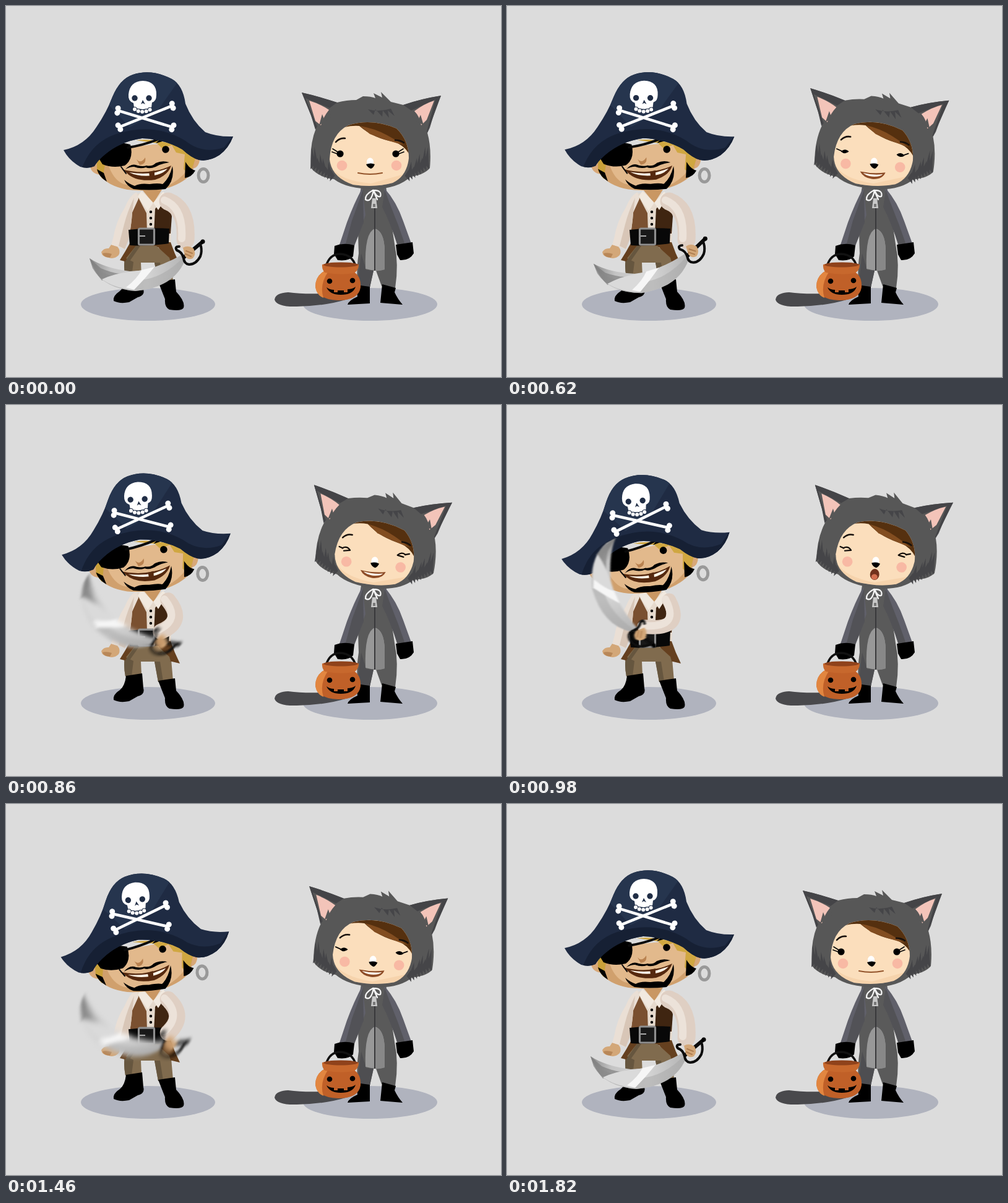
Animation of 800x600 px, one loop 1940 ms. Source, as an HTML page:

```html
<!DOCTYPE html>
<html lang="en">
<head>
<meta charset="utf-8">
<title>Pirate and cat</title>
<style>
html, body { margin: 0; width: 100%; height: 100%; overflow: hidden; background: #dcdcdc; }
svg { display: block; width: 100%; height: 100%; }
.line { fill: none; stroke-linecap: round; stroke-linejoin: round; }
</style>
</head>
<body>
<svg viewBox="0 0 800 600">
<defs>
  <linearGradient id="steel" x1="0" x2="1">
    <stop offset="0" stop-color="#8b8b8b"/><stop offset=".22" stop-color="#c4c4c4"/>
    <stop offset=".6" stop-color="#d4d4d4"/><stop offset="1" stop-color="#b4b4b4"/>
  </linearGradient>
  <filter id="smear" x="-20%" y="-60%" width="140%" height="220%"><feGaussianBlur id="blur" stdDeviation="0"/></filter>
  <clipPath id="hatClip"><use href="#hatShape"/></clipPath>
  <clipPath id="faceClip"><use href="#faceShape"/></clipPath>
  <g id="knob" fill="#fff"><circle cx="47" cy="-3.5" r="4.5"/><circle cx="46" cy="4" r="4.5"/></g>
  <g id="bone"><path d="M-45 0H45" stroke="#fff" stroke-width="4.6"/><use href="#knob"/><use href="#knob" transform="scale(-1 1)"/></g>
  <ellipse id="shadow" cy="482.5" rx="108.5" ry="26.5" fill="#b0b3be"/>
</defs>

<use href="#shadow" x="229.5"/><use href="#shadow" x="588.5"/>

<!-- pirate: legs and body -->
<path d="M193 400H266L270 446L246 448L240 415H218L219 437L193 439Q189 420 193 400Z" fill="#806b4e"/>
<path d="M193 400H218L206 414L203 438L193 439Q189 420 193 400ZM240 415H249L254 447L246 448Z" fill="#66563f"/>
<path d="M194 438L220 434L222 458Q225 468 213 471L199 479Q184 482 174 477Q172 469 184 461Q192 455 194 438Z"/>
<path d="M246 446L273 442L275 462Q290 478 287 488Q284 494 264 491Q256 487 257 474Z"/>
<path d="M208 305L232 298L258 304L267 365L266 388H200L202 335Z" fill="#e6dacd"/>
<path d="M214 310L227 335L228 366H200L203 332Z" fill="#7a5030"/>
<path d="M241 328L258 308L268 340L266 368H239Z" fill="#3f2511"/>
<path d="M201 382H266Q272 400 281 418L264 414L246 390H213Q204 400 196 414L184 411Q193 397 201 382Z" fill="#65401f"/>
<path d="M210 388H243L264 407L266 414H206L194 408Z" fill="#806b4e"/>
<path d="M210 388H217L199 414H192Z" fill="#66563f"/>
<path d="M220 297H252L238 319Z" fill="#c99763"/>
<path d="M219 299L238 318L229 332L213 308ZM254 300L238 318L246 330L260 308Z" fill="#f1e9df"/>
<path d="M234 333V354" class="line" stroke="#000" stroke-width="4.4" stroke-dasharray="0 10"/>
<path d="M180 389Q186 396 182 403Q175 410 166 407Q155 406 154 398Q158 391 166 392L170 386Z" fill="#d3a778"/>
<path d="M156 400Q163 398 171 401L168 407Q157 406 156 400Z" fill="#b88758"/>
<path d="M211 301Q200 306 192 326Q178 347 173 376L170 386L192 393L198 378Q202 360 204 334L214 312Z" fill="#eadfd5"/>
<path d="M207 310Q196 333 191 353L182 388L192 393L198 378Q203 352 204 334Z" fill="#d8c6b7"/>
<g id="belt">
  <path d="M198 362Q230 358 264 360L263 384Q230 389 200 387Z" fill="#080808"/>
  <rect x="214.5" y="360" width="25" height="26" rx="2" fill="#191919" stroke="#8f8f8f" stroke-width="3.2"/>
  <path d="M216 372H225" stroke="#aaa" stroke-width="2"/>
</g>
<path id="sleeve" class="line" stroke="#dfcfc3" stroke-width="28"/>
<path id="sheen" class="line" stroke="#ece2d9" stroke-width="12" transform="translate(-6 -2)"/>

<!-- pirate: head -->
<g id="head">
  <ellipse cx="319" cy="274" rx="8" ry="10.5" class="line" stroke="#999" stroke-width="5"/>
  <path d="M296 236Q312 232 313 249Q311 264 298 263ZM152 250Q137 248 136 260Q139 273 156 273Z" fill="#d8a878"/>
  <path d="M144 240H306L302 268Q290 285 262 294Q228 301 196 297Q164 291 150 272Z" fill="#d0a06d"/>
  <path d="M160 232L287 219L294 264Q280 283 258 292Q220 297 190 288Q166 278 160 232Z" fill="#e2b98c"/>
  <path d="M147 246L166 230L160 256L156 280L147 267Z" fill="#c9a03a"/>
  <path d="M210 217Q250 213 296 233L306 247L297 273L287 264L289 240L275 237L268 225L252 230L244 222Z" fill="#d0a741"/>
  <path d="M147 264Q150 276 163 284L158 270ZM290 252Q297 264 306 266Q300 277 289 278Z"/>
  <path d="M151 248Q151 221 179 219L201 224Q207 247 192 258Q173 263 156 256Z"/>
  <path d="M197 229Q222 225 245 216" class="line" stroke="#090909" stroke-width="4"/>
  <path d="M242 222L250 214L260 217Z"/>
  <circle cx="258" cy="232" r="5.8"/>
  <path d="M211 248Q218 256 225 245Q227 256 216 257Z" fill="#b98250"/>
  <path d="M193 264Q203 253 213 258Q222 260 227 258Q236 260 242 254Q253 249 264 253Q250 255 242 260Q232 264 226 261Q217 264 207 260Q200 260 193 264Z"/>
  <path d="M187 264Q214 271 238 267Q253 265 267 258Q262 274 241 281Q210 285 195 270Z" fill="#55290f"/>
  <path d="M199 269Q222 273 242 269L261 263Q255 271 239 274Q215 277 199 269Z" fill="#fff6e8"/>
  <path d="M231 268L240 266V276H232Z" fill="#55290f"/>
  <path d="M186 260L194 271" class="line" stroke="#0b0b0b" stroke-width="2"/>
  <path d="M191 281Q199 288 208 291Q216 286 232 288Q246 286 253 288Q264 279 269 259Q273 282 258 296Q230 299 206 296Q195 291 191 281Z"/>
  <path id="hatShape" d="M93 233Q127 226 146 196Q163 171 172 147Q184 118 205 111Q235 101 268 118Q286 128 290 158Q301 186 322 204Q342 212 367 211Q360 230 345 241Q328 252 312 249Q300 246 285 232Q255 215 220 214Q185 219 160 240Q148 250 143 259Q132 264 120 260Q102 250 93 233Z" fill="#1f2b43"/>
  <g clip-path="url(#hatClip)">
    <path d="M166 160L187 100H270L277 124L243 172L200 196Z" fill="#26354e"/>
    <path d="M122 264Q137 221 178 207Q240 187 290 218Q317 240 352 229L368 209L360 260L300 260Q260 219 225 217Q177 218 150 260Z" fill="#162034"/>
  </g>
  <path d="M221 121Q244 122 243 144Q243 154 236 156L235 164Q221 170 207 164L206 157Q197 154 198 143Q200 122 221 121Z" fill="#fff"/>
  <g fill="#202d45"><circle cx="208" cy="149" r="4.7"/><circle cx="231" cy="149" r="4.7"/><path d="M221 152L225 159L221 157L218 159Z"/></g>
  <g class="line" stroke-dasharray="0 6.5">
    <path d="M208 167Q220 175 234 167" stroke="#202d45" stroke-width="8"/>
    <path d="M208 167Q220 175 234 167" stroke="#fff" stroke-width="6"/>
  </g>
  <use href="#bone" transform="translate(225 182.5) rotate(17)"/>
  <use href="#bone" transform="translate(226 178.5) rotate(-22)"/>
</g>

<!-- blade root is the origin -->
<g id="sword"><g id="metal">
  <path d="M33 -23L3 2" class="line" stroke="#0b0b0b" stroke-width="6"/>
  <path d="M1 -13Q9 -18 18 -12Q23 -3 17 4Q9 8 4 0Z" fill="#d3a778"/>
  <path d="M6 -8L16 -4M5 -3L14 1" class="line" stroke="#af7e51" stroke-width="2"/>
  <path d="M-150 4Q-126 20 -85 25Q-48 25 0 -2L4 8Q-15 52 -76 57Q-126 53 -145 20Z" fill="url(#steel)"/>
  <path d="M-150 4Q-143 24 -124 29Q-80 48 -42 33Q-18 23 1 3L4 8Q-15 52 -76 57Q-126 53 -145 20Z" fill="#a8a8a8" opacity=".5"/>
  <path d="M-150 4L-132 20Q-116 27 -101 29L-130 40Q-143 25 -150 4Z" fill="#777" opacity=".6"/>
  <path d="M-130 38Q-108 28 -85 26L-54 22L-80 55Q-111 52 -130 38Z" fill="#dadada"/>
  <path d="M-66 23L-45 18Q-61 38 -78 55L-91 51Q-73 37 -66 23Z" fill="#f6f6f6"/>
  <path d="M-5 -15Q-13 -15 -9 -9Q0 -6 2 4Q3 13 11 14Q22 14 29 1Q32 -7 30 -16" class="line" stroke="#0b0b0b" stroke-width="4"/>
  <circle cx="33" cy="-23" r="3.5"/>
</g></g>

<!-- cat: body -->
<path d="M434 475Q435 464 456 463Q487 467 527 464L552 474Q518 485 470 486Q438 487 434 475Z" fill="#49494c"/>
<path d="M574 292H614L628 385Q635 418 629 456L607 453L598 428H594L588 455L568 452Q566 424 570 400Q567 330 574 292Z" fill="#5a5a5a"/>
<path d="M574 400L582 427L594 428L588 455L568 452Z" fill="#4e4e51"/>
<path d="M576 294Q562 320 551 350L539 386L562 390L581 338Z" fill="#60606a"/>
<path d="M577 297Q569 320 559 347L548 388L562 390L578 350Z" fill="#525257"/>
<path d="M611 294Q631 316 642 348L655 384L633 388Q622 350 610 325Z" fill="#60606a"/>
<path d="M612 297Q624 330 633 352L645 386L633 388Q621 350 608 325Z" fill="#525256"/>
<path d="M581 425Q579 366 596 360Q611 364 612 395V426Q598 430 581 425Z" fill="#989898"/>
<path d="M596 361Q611 364 612 395V426Q604 429 596 428Z" fill="#888"/>
<path d="M596 326V428" stroke="#38383b" stroke-width="2"/>
<path d="M531 388Q546 382 563 387L561 405Q554 413 536 411L530 401ZM630 386L657 382L659 400Q652 412 637 411L632 402Z"/>
<path d="M566 451L588 454V481L552 483Q554 476 568 470ZM608 450L630 456L628 463Q633 474 641 483L605 480Z"/>
<path d="M593 298Q580 305 581 313Q590 319 594 298Q599 310 605 308Q608 298 594 298M594 299L600 313" class="line" stroke="#f4f4f4" stroke-width="2.3"/>
<path d="M592 311H598L600 327H590Z" fill="#c8c8c8"/><path d="M593 320H597V325H593Z" fill="#777"/>

<!-- pumpkin bucket -->
<path d="M517 421Q523 401 540 401Q560 402 565 421" class="line" stroke="#111" stroke-width="3.5"/>
<path d="M514 429Q500 437 500 454Q503 475 537 476Q570 476 573 455Q574 437 562 430Z" fill="#c06028"/>
<path d="M514 429Q500 437 500 454Q502 468 513 472Q506 451 521 429Z" fill="#e28640"/>
<path d="M511 418Q540 412 570 418Q570 428 562 432Q540 436 515 431Q510 425 511 418Z" fill="#c7682d"/>
<ellipse cx="541" cy="418.5" rx="28" ry="4" fill="#8f421b"/>
<circle cx="523" cy="445" r="4.3"/><circle cx="560" cy="444" r="4.3"/>
<path d="M518 455Q523 459 530 459V463H536V460H546V463H552V458Q560 458 565 454Q561 467 541 467Q523 467 518 455Z"/>

<!-- cat: head -->
<g id="hood">
  <path d="M478 140Q505 146 535 156Q551 152 566 152L577 146Q590 146 597 149L594 141L608 148L606 139Q616 149 622 155L642 160Q671 150 703 145Q694 164 685 197L681 205Q688 230 685 262Q676 273 654 276Q634 295 595 296Q551 296 530 280Q505 277 493 262Q490 225 501 198L493 177Z" fill="#575757"/>
  <path id="fur" fill="#454548"/>
  <path d="M478 140Q505 146 535 156L523 165L484 149L503 195L500 200L493 177Z" fill="#444447"/>
  <path d="M703 145Q671 150 642 160L655 169L694 151L680 203L681 205Q693 172 703 145Z" fill="#444447"/>
  <path d="M490 153Q509 159 522 168Q513 179 509 193L500 186ZM692 153Q676 158 660 170Q669 179 671 193L680 184Z" fill="#f3c4b9"/>
  <path d="M506 193L511 175L515 185L523 169L526 180ZM675 193L670 176L666 185L659 171L656 182Z" fill="#575757"/>
  <path d="M585 167L594 176L597 167L608 179L609 169L619 181L617 169L628 178L622 166Q603 172 585 167Z" fill="#454548"/>
  <path id="faceShape" d="M523 248Q525 207 553 193Q590 181 631 198Q651 217 651 246Q648 275 625 286Q596 294 561 289Q526 277 523 248Z" fill="#fbdebc"/>
  <g clip-path="url(#faceClip)">
    <path d="M520 250Q530 282 590 287L650 270V300H520Z" fill="#efc697" opacity=".45"/>
    <path d="M547 196Q575 180 612 185Q652 195 653 242Q645 226 628 220Q594 214 571 194Q560 193 547 196Z" fill="#55300f"/>
    <path d="M572 194Q596 198 616 209L644 225Q612 217 588 207Z" fill="#824d20"/>
  </g>
  <path d="M533 220Q539 213 548 214M629 217Q638 217 643 221" class="line" stroke="#17100c" stroke-width="2.5"/>
  <g fill="#f8b9a4"><circle cx="543" cy="258" r="8.3"/><circle cx="631" cy="258" r="8.3"/></g>
  <g id="eyesOpen"><circle cx="540" cy="239" r="5.6"/><circle cx="630" cy="239" r="5.6"/>
    <path d="M536 236L528 231M535 239L527 236M634 236L642 231M635 239L643 236" class="line" stroke="#080808" stroke-width="1.7"/></g>
  <g id="eyesHalf"><path d="M534 239Q540 232 547 238Q541 244 534 239ZM624 238Q631 232 637 239Q630 244 624 238Z"/>
    <path d="M535 238L527 235M636 238L643 235" class="line" stroke="#080808" stroke-width="1.8"/></g>
  <path id="eyesShut" class="line" stroke="#100b08" stroke-width="2.2" d="M534 237Q541 232 547 239L537 241M535 237L529 235M637 237Q630 232 624 239L634 241M636 237L643 235"/>
  <ellipse cx="588.5" cy="252" rx="5.5" ry="6.5" fill="#fff"/>
  <path d="M582 256Q590 253 596 256Q593 263 589.5 263Q584 261 582 256Z"/>
  <path id="mouthLine" d="M569 270Q588 274 608 270" class="line" stroke="#93542b" stroke-width="2.2"/>
  <g id="mouthSmile"><path d="M567 269Q589 272 608 268Q604 280 587 280Q573 279 567 269Z" fill="#8d4c27"/>
    <path d="M572 271Q589 274 604 271Q600 276 587 276Q577 275 572 271Z" fill="#fff8ed"/></g>
  <g id="mouthOh"><ellipse cx="589" cy="274" rx="7.5" ry="9" fill="#71321c"/>
    <ellipse cx="589" cy="278" rx="5" ry="4.5" fill="#d47150"/></g>
</g>
</svg>
<script>
const el = id => document.getElementById(id);
const set = (id, name, value) => el(id).setAttribute(name, value);
const LOOP = 1940, STEP = 60;

const mix = (a, b, p) => a + (b - a) * p;
const span = (t, a, b) => Math.min(1, Math.max(0, (t - a) / (b - a)));
const smooth = u => u * u * (3 - 2 * u);
const easeOut = u => Math.sin(u * Math.PI / 2);

const windUp = t => Math.sin(Math.PI * span(t, 440, 680));
const swing = t => 87 * (smooth(span(t, 640, 1060)) - smooth(span(t, 1320, 1560))) - 6 * windUp(t);
const lean = t => 1.2 * (smooth(span(t, 660, 1040)) - smooth(span(t, 1340, 1820))) - .08 * windUp(t);
const tilt = t => easeOut(span(t, 440, 860)) - easeOut(span(t, 1340, 1820));

// the picture moves in steps, with a pause at either end of the swing
function hold(t) {
  if (t < 500) return 0;
  const from = t < 1040 ? 500 : t < 1160 ? 1040 : t < 1340 ? 1160 : 1340;
  if (from === 1040 || from === 1160) return from;
  return Math.min(1820, from + Math.floor((t - from) / STEP) * STEP);
}

function lock(side, i) {
  const x = 588 + side * (94 - 4.5 * i), top = 228 + 5 * i + 7 * Math.sin(i * 4), tip = 264 + 2.8 * i;
  return `M${x} ${top}L${x + side * 2} ${tip}L${x - side * 6} ${tip - 9}Z`;
}

function show(kind, names, chosen) {
  for (const n of names) el(kind + n).style.display = n === chosen ? '' : 'none';
}

function draw(t) {
  const r = swing(t), p = lean(t), c = tilt(t);
  const bend = Math.max(0, r) / 77;
  const speed = Math.abs(swing(t + 20) - swing(t - 20));
  const blur = Math.min(5, Math.max(0, .4 * speed - 1.2));

  set('sword', 'transform', `translate(${285 - .97 * r} ${404 - .54 * Math.abs(r)}) rotate(${r})`);
  set('blur', 'stdDeviation', `${blur * .3} ${blur}`);
  set('metal', 'filter', blur ? 'url(#smear)' : 'none');

  const elbow = mix(293, 288, bend) + ' ' + mix(328, 364, bend);
  const wrist = mix(290, 224, bend) + ' ' + mix(378, 359, bend);
  for (const id of ['sleeve', 'sheen']) set(id, 'd', `M262 316Q${elbow} ${wrist}`);
  set('sleeve', 'stroke-width', mix(29, 23, bend));

  set('belt', 'transform', `translate(0 ${5 * bend})`);
  set('head', 'transform', `translate(0 ${4.7 * p}) rotate(${-4 * p} 228 300)`);
  set('hood', 'transform', `translate(${3 * c} 0) rotate(${6 * c} 590 295)`);

  show('eyes', ['Open', 'Half', 'Shut'], c < .25 ? 'Open' : c < .65 ? 'Half' : 'Shut');
  show('mouth', ['Line', 'Smile', 'Oh'], r > 60 ? 'Oh' : c > .6 ? 'Smile' : 'Line');
  set('mouthOh', 'transform', r > 80 ? 'translate(589 275) scale(.7 1.12) translate(-589 -274)' : '');
}

set('fur', 'd', [...Array(16).keys()].map(i => lock(i < 8 ? -1 : 1, i % 8)).join(''));

const start = performance.now();
let last = -1;
function tick() {
  const t = hold((performance.now() - start) % LOOP);
  if (t !== last) draw(last = t);
  requestAnimationFrame(tick);
}
tick();
</script>
</body>
</html>
```
